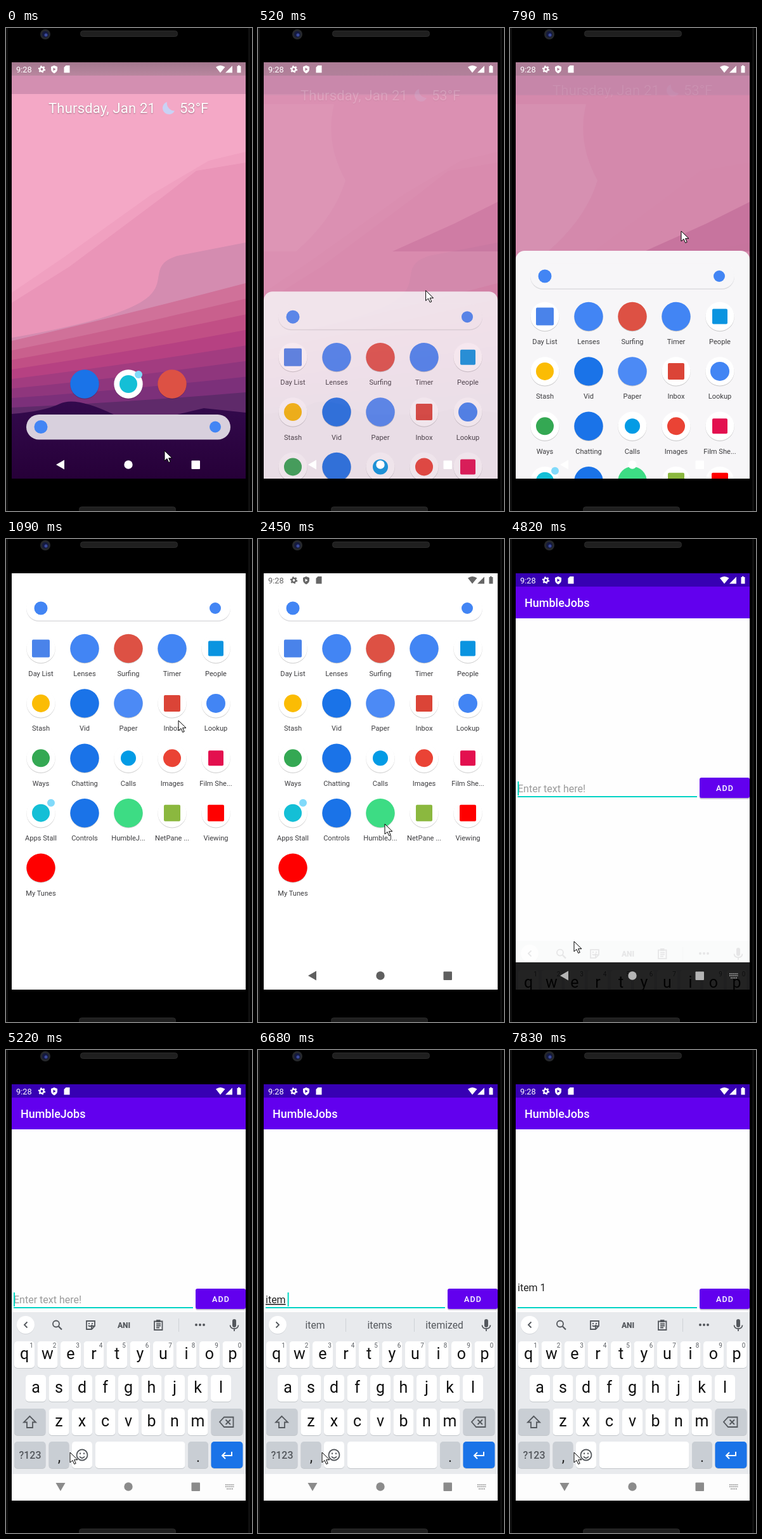
Animation of 388x761 px, one loop 8000 ms. Source, as an HTML page:

```html
<!DOCTYPE html>
<html lang="en">
<head>
<meta charset="utf-8">
<title>Adding an item</title>
<style>
  html, body { margin: 0; width: 100%; height: 100%; overflow: hidden; background: #000; }
  svg { display: block; width: 388px; height: 761px; font-family: Roboto, sans-serif; }
  .mid { text-anchor: middle; }
  .bold { font-weight: 500; }
  .line { fill: none; stroke: #54585d; stroke-width: 1.8; }
</style>
</head>
<body>
<svg viewBox="0 0 388 761">
  <defs>
    <clipPath id="screen"><rect x="9" y="54" width="369" height="656"/></clipPath>
    <linearGradient id="night" x1="0" y1="0" x2="0" y2="1">
      <stop offset="0" stop-color="#330a4d"/><stop offset="1" stop-color="#260038"/>
    </linearGradient>
    <linearGradient id="shade" x1="0" y1="0" x2="0" y2="1">
      <stop offset="0" stop-color="#a3788e"/><stop offset="1" stop-color="#b9879f"/>
    </linearGradient>
  </defs>

  <!-- device body -->
  <rect width="388" height="761"/>
  <path d="M1.500 0V761M383.500 0V761" stroke="#161616" stroke-width="2"/>
  <g fill="#1f1f1f" stroke="#2b2b2b">
    <rect x="117.500" y="4.500" width="153" height="9" rx="4"/>
    <rect x="115.500" y="754.500" width="152" height="9" rx="4"/>
  </g>
  <circle cx="62" cy="10" r="8" fill="#26282c"/>
  <circle cx="62" cy="10" r="5" fill="#141a3f"/>
  <circle cx="63" cy="11" r="2.500" fill="#3b4a9c"/>

  <g clip-path="url(#screen)">
    <g id="home"></g>
    <g id="scrim">
      <rect x="9" y="104" width="369" height="606" fill="#d388ab"/>
      <path d="M9 120H120Q105 180 138 240 120 300 60 352H9Z" fill="#d58fb0"/>
      <path d="M378 274L310 308 212 352H378Z" fill="#c6739d"/>
      <rect x="9" y="75" width="369" height="31" fill="#c686a9"/>
      <rect x="9" y="54" width="369" height="21" fill="#b07f99"/>
    </g>
    <g id="date" font-size="22" fill="#fff" style="text-shadow:0 1px 2px #0005">
      <text x="67" y="134" letter-spacing=".2">Thursday, Jan 21</text>
      <path d="M254 116.500A10 10 0 1 0 266 130.500A12 12 0 0 1 254 116.500Z" fill="#c9d2f5"/>
      <text x="274" y="134">53°F</text>
    </g>
    <g id="drawer"></g>
    <g id="dock"></g>

    <g id="splash">
      <rect x="9" y="54" width="369" height="656" fill="#fff"/>
      <rect x="9" y="54" width="369" height="21" fill="#3700b3"/>
      <rect x="9" y="667" width="369" height="43"/>
    </g>

    <g id="app">
      <rect x="9" y="125" width="369" height="542" fill="#fefefe"/>
      <rect x="9" y="54" width="369" height="21" fill="#3700b3"/>
      <rect x="9" y="75" width="369" height="50" fill="#6200ee"/>
      <rect x="9" y="667" width="369" height="43"/>
      <text class="bold" x="23" y="107" font-size="18" fill="#fff">HumbleJobs</text>
      <g id="entry" font-size="16">
        <text id="hint" x="12" y="652" fill="#9b9b9b">Enter text here!</text>
        <text id="typed" x="12" fill="#222"></text>
        <rect id="rule" x="12" width="283"/>
        <rect id="caret" y="635" width="2" height="22" fill="#03dac5"/>
        <rect x="299" y="630" width="79" height="33" rx="3" fill="#c9c4d4"/>
        <rect x="299" y="629" width="79" height="32" rx="3" fill="#6200ee"/>
        <text class="mid bold" x="339" y="650" font-size="12.500" letter-spacing="1.100" fill="#fff">ADD</text>
      </g>
    </g>

    <g id="keyboard"></g>

    <g id="status">
      <text x="16" y="70" font-size="12.800">9:28</text>
      <g fill="none" stroke="currentColor">
        <circle cx="56.500" cy="65" r="3.100" stroke-width="2.400"/>
        <circle cx="56.500" cy="65" r="4.700" stroke-width="2" pathLength="12" stroke-dasharray="1"/>
      </g>
      <path fill-rule="evenodd" d="M76 59l5 2v4c0 3-2 5-5 6.500-3-1.500-5-3.500-5-6.500v-4zM74.500 62.500v5l4-2.500z"/>
      <path d="M94.500 59h6v11.500h-9v-8.500z"/>
      <path d="M331 61.500q7-5 14.500 0L338 70.500zM357 59.500v11h-11zM364.500 60h1.500v-1.300h2.600V60h1.900v10.500h-6z"/>
    </g>

    <g id="nav">
      <path id="back" d="M79 688L92 680.500V695.500Z"/>
      <circle cx="193" cy="688" r="6.700"/>
      <rect x="292.500" y="681.500" width="13.500" height="13.500" rx="1"/>
      <path id="hide" d="M346 685H360M346 688H360M348 691.500H358" stroke="currentColor" stroke-width="1.700" stroke-dasharray="1.800 .9"/>
    </g>
  </g>
  <path id="pointer" d="M0 0V16L4 12.500 6.700 18.500 9.200 17.400 6.600 11.700H12Z" fill="#fff" stroke="#000" stroke-linejoin="round"/>
</svg>

<script>
const LOOP = 8000, FRAME = 134, LEAD = 20;
const $ = id => document.getElementById(id);
const rect = (x, y, w, h, fill, rx = 0) => `<rect x="${x}" y="${y}" width="${w}" height="${h}" rx="${rx}" fill="${fill}"/>`;
const disc = (x, y, r, fill) => `<circle cx="${x}" cy="${y}" r="${r}" fill="${fill}"/>`;
const shape = (fill, d) => `<path fill="${fill}" d="${d}V710H9Z"/>`;
const label = (x, y, size, fill, s) => `<text class="mid" x="${x}" y="${y}" font-size="${size}" fill="${fill}">${s}</text>`;

// Wallpaper: soft dunes, then evenly spaced ridges that darken towards the mountains.
const RIDGES = 8;
const ridge = (_, i) => {
  const u = i / (RIDGES - 1), left = 493 + 105 * u, right = 402 + 172 * u;
  return shape(`hsl(${335 - 45 * u * u} ${50 - 7 * u}% ${63 - 34 * u}%)`,
    `M9 ${left}Q190 ${(left + right) / 2 + 4} 378 ${right}`);
};
$('home').innerHTML = rect(9, 54, 369, 656, '#f4a8c6') + rect(9, 75, 369, 29, '#d38fb1') +
  rect(9, 54, 369, 21, 'url(#shade)') +
  shape('#f0a0c0', 'M9 417L90 362 230 262 320 209 378 195') +
  shape('#ea95b8', 'M9 433L100 376 250 264 300 225 378 212') +
  shape('#d48cb0', 'M9 488Q200 455 230 418C250 395 228 372 270 359L378 338') +
  Array.from({ length: RIDGES }, ridge).join('') +
  shape('url(#night)', 'M9 608Q60 604 85 592T170 609H270L312 599 378 606');

// Launcher icons: [label, colour, size of the inner shape, square?]; no size means a full disc.
const apps = [
  ['Day List', '#4a83ea', 14, 1], ['Lenses', '#4285f4'], ['Surfing', '#dd5144'], ['Timer', '#4285f4'], ['People', '#0a94e0', 12, 1],
  ['Stash', '#fbbc04', 14], ['Vid', '#1a73e8'], ['Paper', '#4c8af5'], ['Inbox', '#db4437', 13, 1], ['Lookup', '#4285f4', 15],
  ['Ways', '#34a853', 14], ['Chatting', '#1a73e8'], ['Calls', '#039be5', 12], ['Images', '#ea4335', 14], ['Film She...', '#e3104f', 12, 1],
  ['Apps Stall', '#14bfd6', 14], ['Controls', '#1a73e8'], ['HumbleJ...', '#3ddc84'], ['NetPane ...', '#8bb83f', 13, 1], ['Viewing', '#f00', 13, 1],
  ['My Tunes', '#f00']
];
const icon = (x, y, [, fill, size, square]) =>
  disc(x, y + 1, 22.7, '#0003') + disc(x, y, 22.7, size ? '#fff' : fill) +
  (size ? square ? rect(x - size, y - size, 2 * size, 2 * size, fill, 2) : disc(x, y, size, fill) : '');
const badge = (x, y) => disc(x + 16, y - 16, 6, '#81dafa');
const searchMarks = y => disc(55, y, 10.5, '#4285f4') + disc(330, y, 9, '#4285f4');

$('drawer').innerHTML = `<rect id="sheet" x="9" y="69" width="369" height="800" rx="14"/>` +
  rect(32, 90, 322, 40, '#dcdcdf', 20) + `<rect id="field" x="32" y="88.5" width="322" height="40" rx="20"/>` + searchMarks(109) +
  apps.map((app, i) => {
    const x = 55 + 69 * (i % 5), y = 172.5 + 86.4 * Math.floor(i / 5);
    return icon(x, y, app) + (i === 15 ? badge(x, y) : '') + label(x, y + 43.5, 11.1, '#3c3c3f', app[0]);
  }).join('');

$('dock').innerHTML = [11, 15, 2].map((n, i) => icon(124 + 69 * i, 561, apps[n])).join('') + badge(193, 562) +
  rect(32, 609, 322, 39.5, '#d8d0dd', 20) + searchMarks(628.5);

// Keyboard
const key = (x, y, w, fill = '#fff') => rect(x, y + 1, w, 42, '#c3c7cb', 5) + rect(x, y, w, 42, fill, 5);
const letters = (row, x0, y) => [...row].map((c, i) => {
  const x = x0 + 36.5 * i;
  return key(x - 16, y, 32) + label(x, y + 28, 25, '#111', c) +
    (row.length === 10 ? label(x + 11, y + 10, 10, '#5c6065', (i + 1) % 10) : '');
}).join('');
const special = '#c9ced4';
const divider = x => rect(x, 423, 1, 21, '#cfd2d6');

$('keyboard').innerHTML = rect(9, 413, 369, 255, '#e8eaed') + rect(9, 668, 369, 42, '#fdfdfd') +
  letters('qwertyuiop', 29, 459) + letters('asdfghjkl', 47, 512) + letters('zxcvbnm', 83.5, 565) +
  key(13, 565, 49.5, special) + key(323.5, 565, 50, special) +
  key(13, 617, 49.5, special) + key(67.5, 617, 32, special) + key(104, 617, 32) + key(141, 617, 141.5) +
  key(287, 617, 32, special) + key(323.5, 617, 50, '#1a73e8') +
  `<text class="mid bold" x="38" y="644" font-size="16" fill="#54585d">?123</text>` +
  label(84, 649, 23, '#222', ',') + label(303, 649, 23, '#222', '.') +
  `<g class="line">
    <path d="M37.500 577L28 586.500H33V595H42V586.500H47Z"/>
    <path d="M344 578.500H358.500V594H344L337 586ZM346.500 582.500L354 590M354 582.500L346.500 590"/>
    <circle cx="120" cy="638" r="8.500"/><path d="M116 640.500Q120 645.500 124 640.500M117 634.500V637M123 634.500V637"/>
    <path d="M356 633V639H341M346 634L341 639 346 644" stroke="#fff" stroke-width="2"/>
    <path d="M353.500 433.500Q354 439 360 439T366.500 433.500M360 439V443"/>
  </g>` + rect(357, 424, 6, 13, '#54585d', 3) +
  disc(31, 434, 14, '#d3d6da') + disc(31, 433, 14, '#fff') +
  `<path id="chevron" class="line" d="M33.500 428.500L29 433 33.500 437.500"/>
  <g id="tools"><g class="line">
    <circle cx="79" cy="431.500" r="5"/><path d="M83 435.500L88 440.500" stroke-width="2.200"/>
    <path d="M127 427H140V435L135 440H127ZM140 435H135V440M130 434Q133 437 136 433M131 430V432M136 430V432"/>
    <path d="M234 427.500H246.500V441H234ZM237 431.500H244M237 434.500H244M237 437.500H242"/>
    <path d="M237 427H243.500" stroke-width="4"/>
  </g><text class="mid" x="186" y="437.500" font-size="12" font-weight="900" fill="#54585d">ANI</text>` +
  divider(272) + [300, 306, 312].map(x => disc(x, 433, 2, '#54585d')).join('') +
  `</g><g id="words">${divider(138)}${divider(246)}${[90, 192, 294].map(x => label(x, 439, 15.7, '#54585d', '')).join('')}</g>`;

// Motion helpers
const progress = (t, from, to) => Math.min(1, Math.max(0, (t - from) / (to - from)));
const smooth = u => u * u * (3 - 2 * u);
const mix = (a, b, u) => a + (b - a) * u;
const set = (id, attrs) => { for (const name in attrs) $(id).setAttribute(name, attrs[name]); };
const show = (id, on) => { $(id).style.display = on ? '' : 'none'; };
const move = (x, y) => `translate(${x} ${y})`;

// Pointer legs: from time, to time, destination.
const legs = [
  [0, 784, 270, 320], [784, 1052, 272, 286], [1200, 2000, 200, 449], [2500, 2930, 213, 452], [3220, 4130, 101, 634]
];
const pointerAt = t => legs.reduce(([x, y], [from, to, toX, toY]) => {
  const u = smooth(progress(t, from, to));
  return [mix(x, toX, u), mix(y, toY, u)];
}, [250, 666]);

// Typing: time, text, suggestions.
const typing = [
  [0, ''], [6170, 'i'], [6440, 'it', 'it', 'its', 'item'], [6560, 'ite', 'item', 'items', 'iterate'],
  [6680, 'item', 'item', 'items', 'itemized'], [6960, 'item 1', '', '1', ''], [7270, 'item 1']
];

function drawLauncher(t) {
  const [x, y] = pointerAt(t);
  const dragged = 628 - .685 * (666 - y);
  const search = mix(dragged, 109, smooth(progress(t, 784, 1052)));
  const pull = (628 - search) / 519;
  const open = pull === 1;
  const sheet = open ? '#fff' : '#f7f6f8';
  set('pointer', { transform: move(x, y) });
  set('scrim', { opacity: Math.min(.95, pull * 2.2) });
  set('date', { opacity: Math.max(.08, 1 - pull * 2.5), transform: move(0, -61 * pull) });
  set('drawer', { opacity: Math.min(1, pull * 2.5), transform: move(0, search - 109) });
  set('sheet', { fill: sheet, y: open ? 40 : 69 });
  set('field', { fill: sheet });
  set('dock', { opacity: Math.max(0, 1 - pull * 3), transform: move(0, search - 628) });

  const launch = progress(t, 2480, 2790);
  set('splash', {
    opacity: Math.min(1, 3 * launch),
    transform: `${move(193, 431)} scale(${mix(.25, 1, smooth(launch))}) ${move(-193, -431)}`
  });
}

function drawEntry(t) {
  const focused = t >= 4290, wrapped = t >= 7270;
  const [, text, ...words] = typing.findLast(([from]) => from <= t);
  set('entry', { transform: move(0, t < 4690 ? 0 : -253) });
  set('rule', { y: focused ? 658 : 659, height: focused ? 2 : 1, fill: focused ? '#03d3c5' : '#8c8c8c' });
  show('hint', !text);
  $('typed').textContent = text;
  set('typed', { y: wrapped ? 633 : 652, 'text-decoration': t < 6960 ? 'underline' : 'none' });
  show('caret', focused && t < 7830 && !(t >= 5770 && t < 6170));
  set('caret', { x: text && !wrapped ? 15 + $('typed').getComputedTextLength() : 12 });

  const suggesting = words.length > 0;
  show('tools', !suggesting);
  show('words', suggesting);
  $('words').querySelectorAll('text').forEach((el, i) => { el.textContent = words[i] || ''; });
  set('chevron', { transform: suggesting ? 'rotate(180 31 433)' : '' });
}

function drawBars(t) {
  const status = t >= 1240 && t < 2830 ? '#666' : '#fff';
  const nav = t < 1240 ? '#fff' : t < 3240 ? '#5f5f5f' : t < 4820 ? '#fff' : t < 5090 ? '#b4b4b4' : '#8b8b8b';
  set('status', { fill: status, color: status });
  set('nav', { fill: nav, color: nav });
  set('back', { transform: t >= 4950 ? 'rotate(-90 86 688)' : '' });
  show('hide', t >= 4820);
}

function draw(t) {
  // Movement advances in coarse steps, like a screen recording.
  const stepped = Math.floor((t + LEAD) / FRAME) * FRAME - LEAD;
  drawLauncher(stepped);
  show('app', t >= 3240);
  drawEntry(t);
  const rise = progress(stepped, 4740, 5200);
  set('keyboard', { opacity: rise, transform: move(0, 297 * (1 - rise) ** 2) });
  drawBars(t);
}

let start;
function tick(now) {
  start ??= now;
  draw((now - start) % LOOP);
  requestAnimationFrame(tick);
}
draw(0);
requestAnimationFrame(tick);
</script>
</body>
</html>
```
